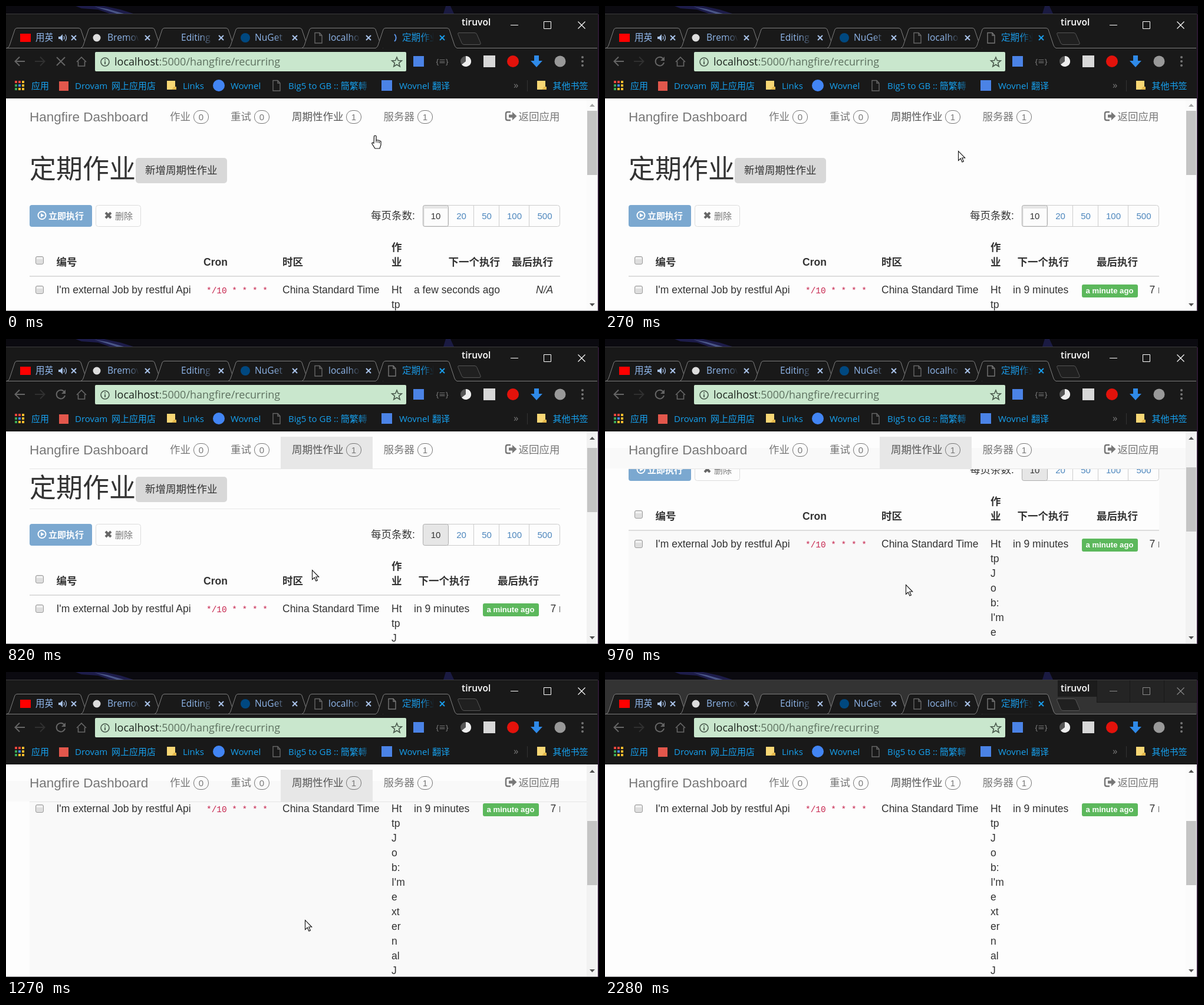
Recreate the animation shown at these times as an HTML page. Size 1006 by 518 pixels, loop 2380 ms.

```html
<!DOCTYPE html>
<html lang="zh-CN">
<head>
<meta charset="utf-8">
<style>
  html, body { margin: 0; width: 100%; height: 100%; overflow: hidden; background: #191919; }
  svg { display: block; }
  text { font-family: "Liberation Sans", "Noto Sans CJK SC", "Noto Sans CJK", sans-serif; white-space: pre; }
  .ui { font-family: "Open Sans", "Noto Sans CJK SC", "Noto Sans CJK", sans-serif; }
  .code { font-family: "Liberation Mono", monospace; }
  .b { font-weight: bold; }
  .semi { font-weight: 600; }
  .m { text-anchor: middle; }
  .i { font-style: italic; }
</style>
</head>
<body>
<svg id="stage" width="1006" height="518" viewBox="0 0 1006 518"></svg>
<script>
const LOOP = 2380, LOADED = 270, SCROLLED = 820, STRIPED = 970, CLEARED = 1540, INACTIVE = 2280;

const text = (x, y, s, size = 17.5, fill = '#333', cls = '') =>
  `<text x="${x}" y="${y}" font-size="${size}" fill="${fill}" class="${cls}">${s}</text>`;
const rect = (x, y, w, h, fill, more = '') =>
  `<rect x="${x}" y="${y}" width="${w}" height="${h}" fill="${fill}" ${more}/>`;
const path = (d, stroke, width = 1, fill = 'none', more = '') =>
  `<path d="${d}" stroke="${stroke}" stroke-width="${width}" fill="${fill}" ${more}/>`;
const circle = (x, y, r, fill, more = '') => `<circle cx="${x}" cy="${y}" r="${r}" fill="${fill}" ${more}/>`;
const during = (from, to, body) => `<g data-from="${from}" data-to="${to}">${body}</g>`;
const cross = (x, y, r, color, width = 2) =>
  path(`M${x - r} ${y - r}l${2 * r} ${2 * r}m0 ${-2 * r}l${-2 * r} ${2 * r}`, color, width);
const page = (x, y, color) => path(`M${x - 6} ${y - 8.5}h8l4 4.500v13h-12zM${x + 2} ${y - 8.5}v4.500h4`, color, 1.4);
const folder = (x, y) => rect(x - 7, y - 8, 14, 15, '#f8d775') + path(`M${x + 1} ${y + 7}h8v-5h-4z`, 'none', 0, '#e5b84c');
const checkbox = y => rect(50.5, y - 6.5, 13, 13, '#dedede', 'rx="2.5" stroke="#9c9c9c"') + rect(52, y - 5, 10, 3, '#f2f2f2');
const pill = (x, n, w = 26) => rect(x + .5, 177.5, w - 1, 22, 'none', 'rx="10.500" stroke="#777"') +
  text(x + w / 2, 194, n, 15, '#777', 'm');

// Page content that scrolls
function pager() {
  const edges = [707, 751, 794, 837, 888, 940];
  const box = rect(707.5, 338.5, 232, 36, '#fdfdfd', 'rx="4" stroke="#ccc"');
  const first = rect(707.5, 338.5, 43, 36, '#e6e6e6', 'rx="3" stroke="#adadad"');
  return text(619, 362, '每页条数:') + box + first +
    during(0, SCROLLED, rect(710, 344, 39, 29, '#fcfcfc')) +
    [10, 20, 50, 100, 500].map((n, k) =>
      (k > 1 ? path(`M${edges[k] - .5} 339v36`, '#ccc') : '') +
      text((edges[k] + edges[k + 1]) / 2, 362, n, 15, k ? '#4c86bd' : '#333', 'm')).join('');
}

function table() {
  const wrapped = ['Ht', 'tp', 'J', 'o', 'b:', "I'm", 'e', 'xt', 'er', 'n', 'al', 'J', 'o'];
  const head = (x, s, y = 441) => text(x, y, s, 17.5, '#333', 'b');
  return during(STRIPED, INACTIVE, rect(40, 460, 900, 400, '#f9f9f9')) +
    during(CLEARED, INACTIVE, rect(50, 470, 890, 293, '#fdfdfd')) +
    checkbox(432) + checkbox(482) + rect(40, 458, 900, 2, '#ddd') +
    head(85.5, '编号') + head(335, 'Cron') + head(469, '时区') + head(654, '作', 416) + head(654, '业') +
    text(85.5, 488, "I'm external Job by restful Api") +
    text(340, 488, '*/10 * * * *', 14.43, '#c7254e', 'code') +
    text(469, 488, 'China Standard Time') +
    wrapped.map((s, k) => text(654, 488 + 25 * k, s)).join('') +
    during(0, 130, head(750.5, '下一个执行') + head(858, '最后执行') +
      text(692, 488, 'a few seconds ago') + text(899, 488, 'N/A', 17.5, '#333', 'i')) +
    during(130, LOOP, head(699.5, '下一个执行') + head(834, '最后执行') + text(692, 488, 'in 9 minutes') +
      rect(809, 473, 95, 22, '#5cb85c', 'rx="3"') + text(856, 488, 'a minute ago', 13.125, '#fff', 'b m') +
      text(923.5, 488, '7 minutes'));
}

const content = text(40, 293, '定期作业', 45) +
  rect(220, 258, 155, 43, '#d8d8d8', 'rx="5"') + text(236, 285, '新增周期性作业') +
  during(SCROLLED, INACTIVE, rect(40, 312, 900, 1, '#e8e8e8')) +
  rect(40, 338, 106, 37, '#7ba8d0', 'rx="4"') +
  circle(61, 355.5, 6.5, 'none', 'stroke="#fff" stroke-width="2"') + path('M59 352l6 3.500-6 3.500z', 'none', 0, '#fff') +
  text(72, 362, '立即执行', 15, '#fff', 'b') +
  rect(152.5, 338.5, 76, 36, '#fdfdfd', 'rx="4" stroke="#ddd"') + cross(173.5, 355.5, 4.5, '#666', 4) +
  text(185, 362, '删除', 15, '#777') + pager() + table();

const navbar = rect(0, 157, 985, 63, '#fdfdfd') +
  during(STRIPED, INACTIVE, rect(0, 185, 985, 35, '#f9f9f9') + rect(940, 221, 45, 296, '#f9f9f9')) +
  during(SCROLLED, INACTIVE, rect(466, 166, 156, 54, '#e7e7e7') + rect(40, 220, 945, 1, '#e5e5e5')) +
  text(40, 195.5, 'Hangfire Dashboard', 22.5, '#777') +
  text(278, 194, '作业', 17.5, '#777') + pill(318, 0) +
  text(381, 194, '重试', 17.5, '#777') + pill(421, 0) +
  text(485, 194, '周期性作业', 17.5, '#555') + pill(577, 1) +
  text(640.5, 194, '服务器', 17.5, '#777') + pill(698, 1) +
  path('M856 180h-5q-3 0-3 3v8q0 3 3 3h5', '#777', 2.5) +
  path('M853 184.500h6v-4.500l7.500 7-7.500 7v-4.500h-6z', 'none', 0, '#777') +
  text(869.5, 194, '返回应用', 17.5, '#777');

const scrollbar = rect(985, 157, 19, 360, '#fbfbfb') +
  during(SCROLLED, INACTIVE, rect(985, 157, 18, 360, '#f2f2f2')) +
  `<g id="thumb">${rect(986, 178, 17, 109, '#c4c4c4')}</g>` +
  during(0, SCROLLED, path('M990 171h9l-4.500-5z', 'none', 0, '#a3a3a3')) +
  during(SCROLLED, LOOP, path('M990 171h9l-4.500-5z', 'none', 0, '#505050')) +
  path('M990 505h9l-4.500 5z', 'none', 0, '#505050');

// Browser window
const EDGE = '#7d7d7d';

function tab(name, k) {
  const x = 2 + 125 * k, active = k === 5, from = k ? x + 45 : 50;
  const shape = `M${x} 71.500Q${x + 3} 70 ${x + 4} 67L${x + 13} 40Q${x + 14} 37.500 ${x + 17} 37.500H${x + 121}` +
    `Q${x + 124} 37.500 ${x + 125} 40L${x + 134} 67Q${x + 135} 70 ${x + 138} 71.500`;
  return path(shape, EDGE, 1, '#191919') +
    text(from, 59, name, 15.6, active ? '#1a9be8' : '#8fb6ea', 'ui') +
    rect(x + 78, 42, 21, 26, 'url(#fade)') + rect(x + 98, 42, 24, 26, '#191919') +
    cross(x + 113, 54, 4, active ? '#1a9be8' : '#a9c3ea');
}

function tabs() {
  const spinner = turn => path('M659 48a8 8 0 0 1 0 12', '#5b94e8', 2, 'none', `transform="rotate(${turn} 655 54)"`);
  return ['用英', 'Bremov', 'Editing', 'NuGet', 'localhost', '定期作业'].map(tab).join('') +
    rect(79, 42, 24, 26, '#191919') +
    rect(24, 47, 18, 14, '#f00') + circle(154, 54, 6.5, '#ddd') + circle(406, 54, 8, '#004880') + page(530, 54, '#666') +
    path('M89 52h3l4-4v12l-4-4h-3z', 'none', 0, '#a9c3ea') + path('M98 51q2 3 0 6M100.500 48.500q4 5.500 0 11', '#a9c3ea', 1.2) +
    during(0, 130, spinner(0)) + during(130, LOADED, spinner(120)) + during(LOADED, LOOP, page(655, 54, '#777')) +
    path('M0 71.500H627M765 71.500H1003', EDGE) +
    path('M768 45.500h27q3 0 4 3l6 14q1 3-2 3h-26q-3 0-4-3l-6-14q-1-3 1-3z', '#555', 1, '#202020');
}

const desktop = rect(0, 0, 1006, 14, '#0b0a10') +
  path('M118 0h48l28 6 22 7h-40l-20-7-28-2z', 'none', 0, '#1d1c4a') + path('M150 1l22 4 28 8h-12z', 'none', 0, '#4a5688') +
  path('M742 13l4-13h8l6 13z', 'none', 0, '#1a1a42');

const title = rect(0, 13, 1004, 144, '#191919') +
  during(INACTIVE, LOOP, rect(0, 14, 1004, 58, '#333') + rect(768, 14, 66, 28, '#1c1c1c') +
    rect(834, 14, 170, 37, '#242424') + path('M834.500 14v37M890.500 14v37M948.500 14v37M834 51.500h170', '#191919')) +
  rect(0, 13, 1004, 1, '#3c3c3c') +
  text(773, 33, 'tiruvol', 15.6, '#fff', 'ui semi');

const windowButtons = color => path('M856 32.500h13M912.500 26.500h12v12h-12z', color) + cross(976.5, 32.5, 6, color, 1.2);

const toolbar = path('M32 94H16M23 86.500L15.500 94l7.500 7.500', '#656565', 2) +
  path('M49 94h16M58 86.500l7.500 7.500-7.500 7.500', '#303030', 2) +
  during(0, LOADED, cross(93, 94, 7, '#656565')) +
  during(LOADED, LOOP, path('M99 90a7.300 7.300 0 1 0 1 6', '#656565', 2) + path('M101 86v7h-7z', 'none', 0, '#656565')) +
  path('M120 95l8-8 8 8M122.500 94v8h11v-8', '#656565', 1.7) +
  rect(151, 78, 528, 33, '#c9e7cd', 'rx="2"') +
  circle(168, 95, 7, 'none', 'stroke="#46564a" stroke-width="1.600"') + path('M168 94v5M168 90.500v2', '#46564a', 1.8) +
  text(184, 101, 'localhost<tspan fill="#5d705f">:5000/hangfire/recurring</tspan>', 18, '#1d241e', 'ui') +
  path('M663 87l2.300 5.600 6 .4-4.700 3.800 1.600 6-5.200-3.300-5.200 3.300 1.600-6-4.700-3.800 6-.4z', '#4a5a4d', 1.6) +
  rect(691, 85, 18, 18, '#4b83e6') + text(740, 98.5, '{≡}', 12, '#888', 'ui m') +
  circle(780, 94, 9, '#555') + path('M780 85a9 9 0 1 1-7 14.500l7-5.500z', 'none', 0, '#eee') +
  rect(810, 84, 20, 20, '#d8d8d8') + circle(860, 94, 10, '#e3120b') +
  path('M896 84h8v9h6l-10 11-10-11h6z', 'none', 0, '#2f8ae8') +
  circle(940, 94, 9.5, '#999') + [87, 94, 101].map(y => circle(978, y, 2, '#757575')).join('');

function bookmarks() {
  const label = (x, s) => text(x, 141, s, 15, '#16a0ee', 'ui');
  const colors = ['#e8453c', '#e8453c', '#f9bb2d', '#3aa757', '#4688f1', '#f9bb2d', '#3aa757', '#f9bb2d', '#f9bb2d'];
  return colors.map((c, k) => rect(15 + 6 * (k % 3), 127 + 6 * (k / 3 | 0), 4, 4, c)).join('') +
    label(43, '应用') + rect(90, 128, 16, 16, '#e2574c') + label(117, 'Drovam') + label(179, '网上应用店') +
    folder(280, 135) + label(300, 'Links') + circle(361, 135, 10, '#4285f4') + label(381, 'Wovnel') +
    page(459, 135, '#666') + label(479, 'Big5 to GB :: 簡繁轉') +
    rect(598, 122, 21, 26, 'url(#fade)') + rect(618, 122, 17, 26, '#191919') +
    rect(637, 126, 18, 18, '#4b83e6') + label(667, 'Wovnel') + label(723, '翻译') +
    text(861, 140, '»', 17, '#777', 'ui') + rect(884, 126, 1, 19, '#333') + folder(908, 135) + label(927.5, '其他书签');
}

const arrow = path('M.5 .5v16l3.700-3.500 2.700 6 2.500-1.100-2.700-5.900h5z', '#111', 1.1, '#fff');
const hand = path('M624.500 221q2-2 3.500 0v7q4-1 8 2v6l-2 6h-8l-5-8q-1-3 3-1z', '#111', 1.2, '#fff') +
  path('M628 228v4M631 229v3.500M633.500 230v3', '#111', 1);

const stage = document.getElementById('stage');
stage.innerHTML = `<defs>
  <linearGradient id="fade"><stop stop-color="#191919" stop-opacity="0"/><stop offset="1" stop-color="#191919"/></linearGradient>
  <clipPath id="view"><rect x="0" y="157" width="940" height="360"/></clipPath></defs>` +
  rect(0, 0, 1006, 518, '#2a1830') + rect(0, 157, 1004, 360, '#fdfdfd') + rect(0, 517, 1004, 1, '#8c8c90') +
  `<g clip-path="url(#view)"><g id="content">${content}</g></g>` + navbar + scrollbar +
  desktop + title + tabs() + during(0, INACTIVE, windowButtons('#fff')) + during(INACTIVE, LOOP, windowButtons('#8a8a8a')) +
  toolbar + bookmarks() + during(0, 130, hand) + during(130, CLEARED, `<g id="cursor">${arrow}</g>`);

const steps = [
  [0, 0, 613, 238], [270, 0, 599, 246], [400, 0, 582, 256], [550, 0, 552, 310], [670, 0, 520, 366],
  [820, 24, 519, 392], [970, 134, 510, 417], [1120, 244, 508, 420], [1270, 250, 507, 421]
];
const timed = [...stage.querySelectorAll('[data-from]')];
const move = (id, x, y) => document.getElementById(id).setAttribute('transform', `translate(${x} ${y})`);

function draw(now) {
  const t = now % LOOP;
  const [, scroll, x, y] = steps.findLast(step => step[0] <= t);
  for (const g of timed) g.style.display = t >= +g.dataset.from && t < +g.dataset.to ? '' : 'none';
  move('content', 0, -scroll);
  move('thumb', 0, Math.round(scroll * .3));
  move('cursor', x, y);
}

const start = performance.now();
function tick() {
  draw(performance.now() - start);
  requestAnimationFrame(tick);
}
tick();
</script>
</body>
</html>
```
